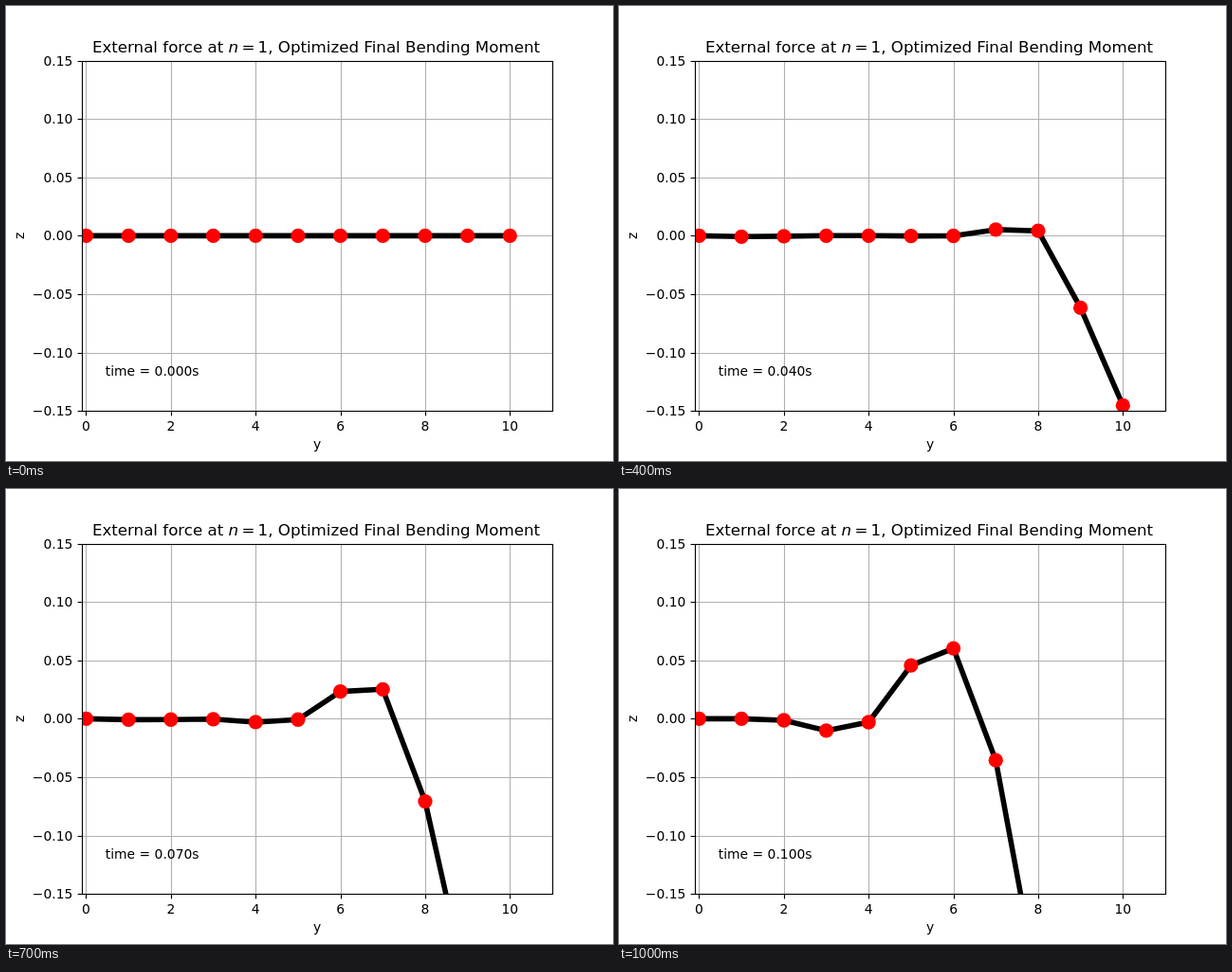
Write an HTML page that moves like this. It is 640x480 px and loops after 1.1 s.

```html
<!DOCTYPE html>
<html lang="en">
<head>
<meta charset="utf-8">
<title>Bending beam</title>
<style>
  html, body { margin: 0; width: 100%; height: 100%; overflow: hidden; background: #fff; }
  svg { display: block; width: 640px; height: 480px; }
  text { font: 13.89px "DejaVu Sans", sans-serif; white-space: pre; }
  .title { font-size: 16.67px; }
  .mid { text-anchor: middle; }
  .end { text-anchor: end; }
  .grid { stroke: #b0b0b0; stroke-width: 1.11; }
  .axis { stroke: #000; stroke-width: 1.11; fill: none; }
  #beam { fill: none; stroke: #000; stroke-width: 5.56; stroke-linejoin: round; }
  #nodes { fill: #f00; }
</style>
</head>
<body>
<svg viewBox="0 0 640 480">
  <clipPath id="plot"><rect x="80" y="58" width="496" height="369"/></clipPath>
  <g id="grid"></g>
  <g clip-path="url(#plot)">
    <polyline id="beam"/>
    <g id="nodes"></g>
  </g>
  <rect class="axis" x="80.5" y="58.5" width="496" height="369"/>
  <g id="ticks"></g>
  <text class="title" x="90.9" y="49">External force at <tspan font-style="italic">n</tspan><tspan dx="3.25">=</tspan><tspan dx="3.25">1, Optimized Final Bending Moment</tspan></text>
  <text class="mid" x="328" y="467">y</text>
  <text class="mid" transform="translate(19 242.4) rotate(-90)">z</text>
  <text id="clock" x="104.8" y="390"></text>
</svg>
<script>
  const $ = id => document.getElementById(id);
  const toX = y => 84.468 + 44.685 * y;
  const toY = z => 242.4 - 1232 * z;
  const snap = v => Math.floor(v + 0.5) + 0.5;

  function add(parent, tag, attrs, text = "") {
    const el = document.createElementNS("http://www.w3.org/2000/svg", tag);
    for (const name in attrs) el.setAttribute(name, attrs[name]);
    el.textContent = text;
    return parent.appendChild(el);
  }
  const line = (parent, cls, x1, y1, x2, y2) =>
    add(parent, "line", { class: cls, x1, y1, x2, y2 });

  for (let v = 0; v <= 10; v += 2) {
    const x = snap(toX(v));
    line($("grid"), "grid", x, 58, x, 427);
    line($("ticks"), "axis", x, 427.5, x, 432.4);
    add($("ticks"), "text", { class: "mid", x: toX(v), y: 448 }, v);
  }
  for (let i = -3; i <= 3; i++) {
    const y = snap(toY(i * 0.05));
    if (Math.abs(i) < 3) line($("grid"), "grid", 80, y, 576, y);
    line($("ticks"), "axis", 75.6, y, 80.5, y);
    const label = (i < 0 ? "\u2212" : "") + Math.abs(i * 0.05).toFixed(2);
    add($("ticks"), "text", { class: "end", x: 70.3, y: Math.round(toY(i * 0.05) + 5) }, label);
  }

  // Downward deflection in pixels of each node at the key steps.
  const keys = [0, 2, 4, 6, 8, 9, 10];
  const drops = [
    [0, 0, 0, 0, 0, 0, 0],
    [0, 0.6, 0.9, 1, 0.9, 0.7, 0],
    [0, 0, 0.5, 0.9, 0.7, 0.6, 1.6],
    [0, 0, -0.1, 0.3, 1.7, 5.6, 12.5],
    [0, -0.2, -0.1, 0.6, 6.8, 8.8, 3.6],
    [0, -0.3, 0.2, 2.3, -7.4, -28.3, -56.3],
    [0, -0.3, 0.1, -10.3, -50.3, -68.3, -74.3],
    [0, -0.3, -6.5, -30.3, -20, 7.8, 43.8],
    [0, -1.4, -5.2, 40, 146, 211, 284],
    [0, 6, 76, 210, 365, 440, 515],
    [0, 57, 179, 330, 500, 590, 680]
  ];

  function slope(row, i) {
    if (i === 0) return 0;
    const rate = j => (row[j + 1] - row[j]) / (keys[j + 1] - keys[j]);
    if (i === keys.length - 1) return rate(i - 1);
    const before = keys[i] - keys[i - 1], after = keys[i + 1] - keys[i];
    return (rate(i - 1) * after + rate(i) * before) / (before + after);
  }

  // Cubic Hermite interpolation between key steps.
  function dropAt(row, step) {
    let i = 0;
    while (i < keys.length - 2 && step >= keys[i + 1]) i++;
    const h = keys[i + 1] - keys[i], u = (step - keys[i]) / h, w = 1 - u;
    return row[i] * w * w * (1 + 2 * u) + row[i + 1] * u * u * (3 - 2 * u)
      + h * u * w * (slope(row, i) * w - slope(row, i + 1) * u);
  }

  const nodes = drops.map((_, n) => add($("nodes"), "circle", { cx: toX(n), r: 7.64 }));
  let shown = -1;

  function draw(now) {
    const step = Math.floor((now % 1100) / 100);
    if (step !== shown) {
      shown = step;
      const ys = drops.map(row => toY(0) + dropAt(row, step));
      $("beam").setAttribute("points", ys.map((y, n) => toX(n) + "," + y).join(" "));
      nodes.forEach((node, n) => node.setAttribute("cy", ys[n]));
      $("clock").textContent = `time = ${(step / 100).toFixed(3)}s`;
    }
    requestAnimationFrame(draw);
  }
  draw(0);
</script>
</body>
</html>
```
